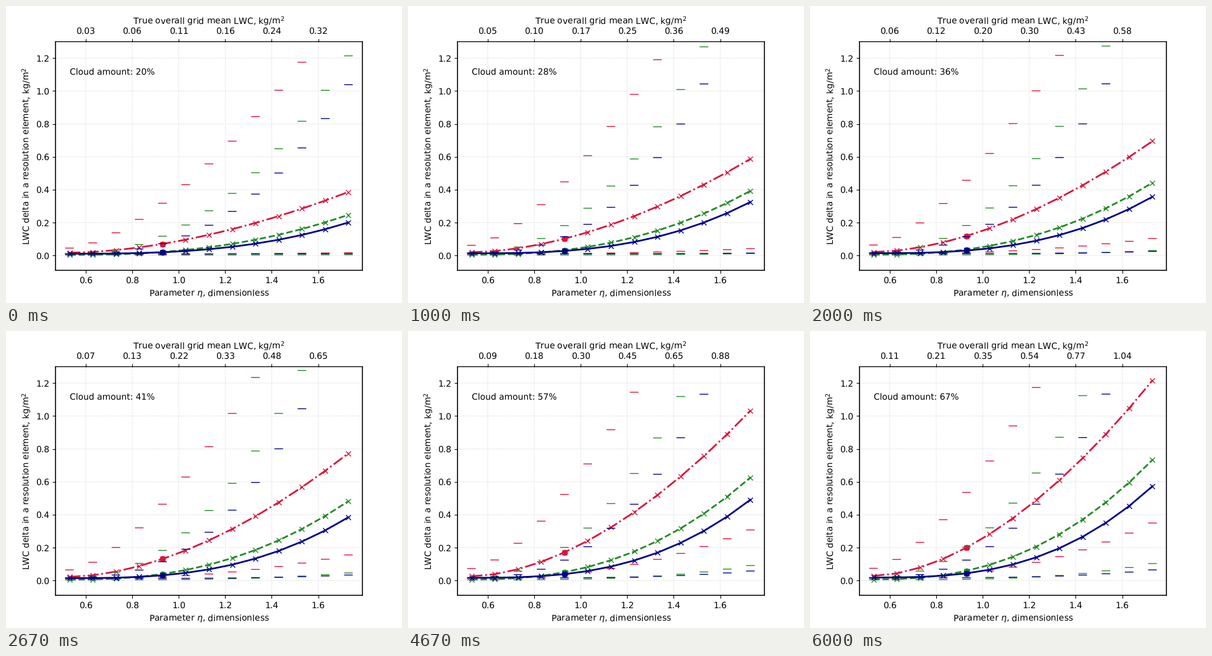
Write a matplotlib script that moves like this. It is 640 px wide and 480 px high and loops after 6.33 s.

```python
import matplotlib.pyplot as plt
import numpy as np
from matplotlib.animation import FuncAnimation

FRAMES = 19
LOOP_MS = 6330
OFFSET = 0.1 * np.arange(13)
ETA = 0.53 + OFFSET
TICKS = np.arange(0.6, 1.7, 0.2)
MARKED = 4  # index of the highlighted eta
DASH = 0.0185  # half length of a limit dash


def ramp(frame, start, end):
    return np.clip((frame - start) / (end - start), 0, 1)


def overshoot(frame, boost, decay=3):
    """Steady growth with an early boost that fades away."""
    t = ramp(frame, 0, FRAMES - 1)
    return t + boost * ramp(frame, 1, 3) * (1 - t) ** decay


def two_jumps(frame, first, second):
    """Mostly flat, with one early and one late rise."""
    return (first * ramp(frame, 1, 3) + second * ramp(frame, 11, 14)
            + (1 - first - second) * ramp(frame, 0, FRAMES - 1))


def smoothstep(frame):
    t = ramp(frame, 0, FRAMES - 1)
    return t * t * (3 - 2 * t)


def power_curve(base, start_gain, end_gain, power, progress, *args):
    """Power law in eta whose gain follows the given easing."""
    def at(frame):
        p = progress(frame, *args)
        gain = start_gain + p * (end_gain - start_gain)
        return base * (1 + 0.65 * p) + gain * OFFSET ** power
    return at


def dashes(values):
    return np.repeat(values, 3)


SERIES = [
    ("crimson", "-.",
     power_curve(.017, .268, .862, 1.76, overshoot, .13),
     power_curve(.045, 1.13, 1.91, 1.55, two_jumps, .55, .18),
     power_curve(.008, .006, .221, 2.3, smoothstep)),
    ("forestgreen", "--",
     power_curve(.004, .157, .469, 2.4, overshoot, .23),
     power_curve(.010, .806, 1.396, 2.2, two_jumps, .75, .20),
     power_curve(.003, .001, .054, 3.3, smoothstep)),
    ("darkblue", "-",
     power_curve(.011, .114, .333, 2.8, overshoot, .29),
     power_curve(.011, .643, 1.115, 2.57, two_jumps, .81, .18),
     power_curve(.010, .0005, .0245, 3.7, smoothstep)),
]

plt.rcParams.update({"font.family": "DejaVu Sans", "path.snap": False,
                     "text.hinting": "none"})
fig, ax = plt.subplots(figsize=(6.4, 4.8), dpi=100)
ax.set(xlim=(0.47, 1.79), ylim=(-0.09, 1.3),
       xlabel=r"Parameter $\eta$, dimensionless",
       ylabel="LWC delta in a resolution element, kg/m$^2$")
ax.set_xticks(TICKS)
ax.set_yticks(np.arange(0, 1.3, 0.2))
ax.grid(linestyle=":", color="lightgray")
amount = ax.text(0.53, 1.1, "")

top = ax.twiny()
top.set_xlim(ax.get_xlim())
top.set_xticks(TICKS)
top.set_xlabel("True overall grid mean LWC, kg/m$^2$")

dash_x = (ETA[:, None] + [-DASH, DASH, np.nan]).ravel()
artists = []
for color, style, mean_at, high_at, low_at in SERIES:
    mean, = ax.plot(ETA, ETA, style, color=color, lw=2, marker="x")
    high, low = (ax.plot(dash_x, dash_x, color=color, lw=1,
                         solid_capstyle="butt")[0] for _ in range(2))
    dot, = ax.plot([ETA[MARKED]], [0], "o", color=color)
    artists.append((mean, high, low, dot, mean_at, high_at, low_at))


def update(frame):
    for mean, high, low, dot, mean_at, high_at, low_at in artists:
        values = mean_at(frame)
        mean.set_ydata(values)
        dot.set_ydata([values[MARKED]])
        high.set_ydata(dashes(high_at(frame)))
        low.set_ydata(dashes(low_at(frame)))
    amount.set_text(f"Cloud amount: {20 + 47 * frame / (FRAMES - 1):.0f}%")
    scale = 0.10843 + 0.24457 * overshoot(frame, 0.155, 4.5)
    top.set_xticklabels([f"{lwc:.2f}" for lwc in scale * TICKS ** 2.3])
    return []


anim = FuncAnimation(fig, update, frames=FRAMES, init_func=lambda: update(0),
                     interval=LOOP_MS / FRAMES, repeat=True, repeat_delay=0)
plt.show()
```
